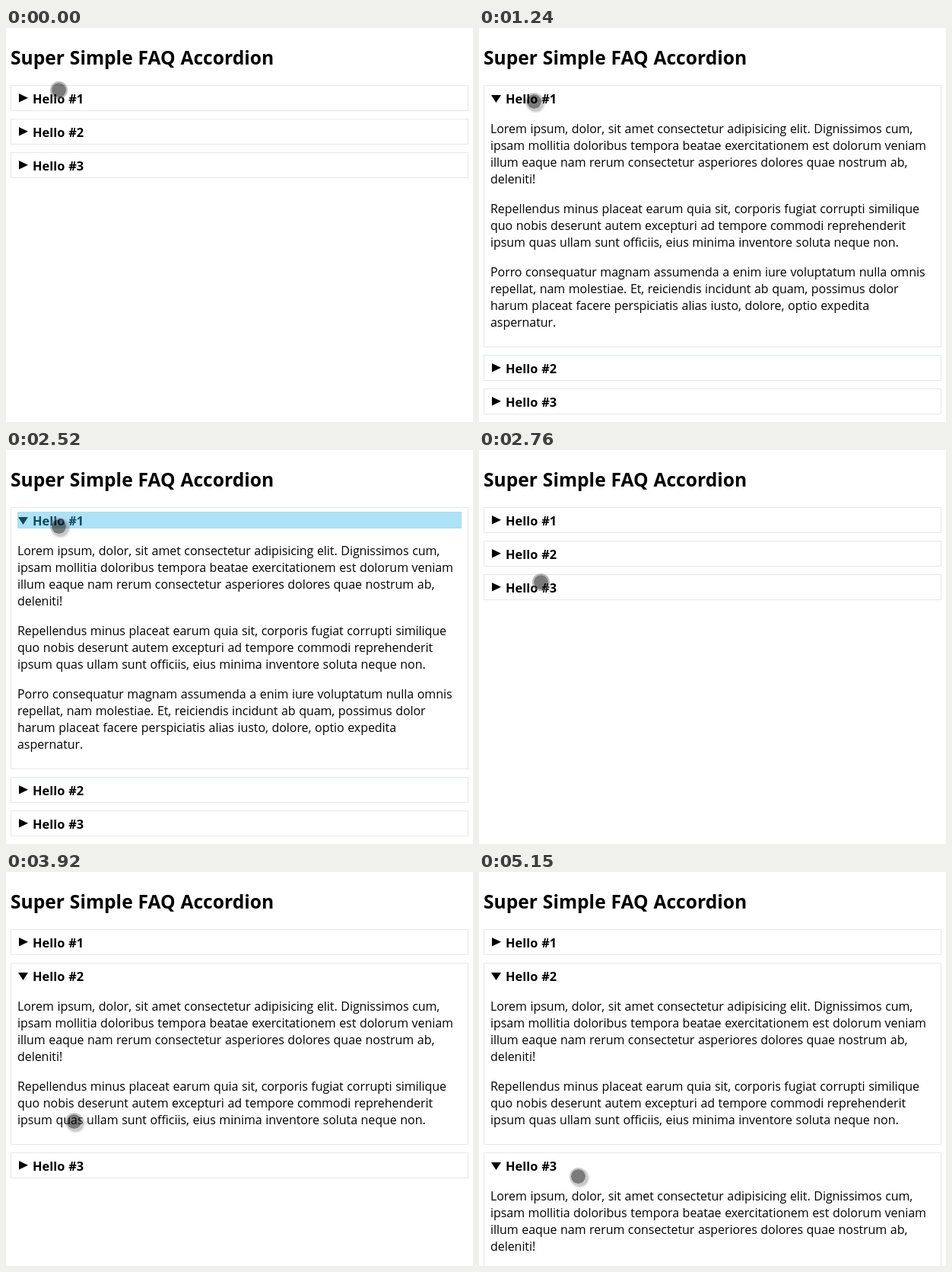
Write an HTML page that moves like this. It is 614 px wide and 517 px high and loops after 6.21 s.

```html
<!DOCTYPE html>
<html lang="en">
<head>
<meta charset="utf-8">
<title>Super Simple FAQ Accordion</title>
<style>
  html, body { margin: 0; width: 100%; height: 100%; overflow: hidden; background: #fff; }
  body { position: relative; color: #000; font: 16px/22px "Open Sans", "Noto Sans", sans-serif; word-spacing: .5px; }
  h2 { position: absolute; left: 6px; top: 22px; margin: 0; font-size: 24.6px; line-height: 34px; white-space: nowrap; }
  #list { position: absolute; left: 6px; top: 75px; width: 602px; }
  .item { box-sizing: border-box; margin-bottom: 10px; padding: 5px 8px; border: 1px solid #e5e7eb; }
  .summary { position: relative; height: 22px; font-weight: 700; font-size: 16.4px; line-height: 23px; }
  .label { position: absolute; left: 20px; }
  .marker { position: absolute; width: 16px; height: 22px; background: #000; clip-path: polygon(2px 5px, 14px 10.7px, 2px 16.5px); }
  .open .marker { clip-path: polygon(1px 7px, 14px 7px, 7.5px 17px); }
  .highlight { position: absolute; inset: 0; background: rgba(51, 181, 229, .4); }
  .content { overflow: hidden; }
  p { position: relative; top: 1px; margin: 17px 0; white-space: pre; letter-spacing: -.05px; }
  #cursor { position: absolute; left: -12px; top: -12px; box-sizing: border-box; width: 23px; height: 23px;
    border: 2px solid rgba(120, 120, 120, .5); border-radius: 50%; background: rgba(0, 0, 0, .52); background-clip: padding-box; }
  .open ~ #cursor, #list:has(.open) ~ #cursor { border-color: rgba(120, 120, 120, .4); box-shadow: 2px 2px 3px rgba(0, 0, 0, .25); }
</style>
</head>
<body>
<h2>Super Simple FAQ Accordion</h2>
<div id="list"></div>
<div id="cursor"></div>
<script>
const LOOP = 6210, STEP = 60, GLIDE = 120;
const OPEN_DELAY = 246, OPEN_TIME = 300;

const paragraphs = [
  `Lorem ipsum, dolor, sit amet consectetur adipisicing elit. Dignissimos cum,
ipsam mollitia doloribus tempora beatae exercitationem est dolorum veniam
illum eaque nam rerum consectetur asperiores dolores quae nostrum ab,
deleniti!`,
  `Repellendus minus placeat earum quia sit, corporis fugiat corrupti similique
quo nobis deserunt autem excepturi ad tempore commodi reprehenderit
ipsum quas ullam sunt officiis, eius minima inventore soluta neque non.`,
  `Porro consequatur magnam assumenda a enim iure voluptatum nulla omnis
repellat, nam molestiae. Et, reiciendis incidunt ab quam, possimus dolor
harum placeat facere perspiciatis alias iusto, dolore, optio expedita
aspernatur.`
];

// Each item lists its taps: the first opens it, the second closes it.
const taps = [[700, 2400], [3320], [4550]];

// The cursor rests between stops and glides to each one just before its arrival time.
const stops = [
  { arrive: 0, x: 70, y: 82 },
  { arrive: 440, x: 67, y: 95 },
  { arrive: 1240, x: 73, y: 97 },
  { arrive: 1820, x: 77, y: 134 },
  { arrive: 1940, x: 71, y: 115 },
  { arrive: 2200, x: 70, y: 101 },
  { arrive: 2760, x: 82, y: 174 },
  { arrive: 3120, x: 91, y: 143 },
  { arrive: 3620, x: 104, y: 184 },
  { arrive: 3920, x: 90, y: 328 },
  { arrive: 4220, x: 99, y: 394 },
  { arrive: 5150, x: 131, y: 400 }
];

// Every tap or glide restarts the stepped clock.
const clockStarts = [0, ...taps.flat(), ...stops.map(stop => stop.arrive - GLIDE)];

const items = taps.map(([opening, closing = Infinity], index) => {
  const texts = paragraphs.slice(0, 3 - index);
  const box = document.createElement("div");
  box.className = "item";
  box.innerHTML = `<div class="summary"><span class="marker"></span><span class="label">Hello #${index + 1}</span>
    <div class="highlight"></div></div><div class="content">${texts.map(text => `<p>${text}</p>`).join("")}</div>`;
  document.getElementById("list").append(box);
  return {
    opening, closing, box,
    content: box.querySelector(".content"),
    highlight: box.querySelector(".highlight"),
    fullHeight: texts.reduce((sum, text) => sum + 22 * text.split("\n").length + 17, 17)
  };
});

const clamp = value => Math.min(1, Math.max(0, value));
const easeOut = k => 1 - (1 - k) ** 1.6;
const highlightAt = elapsed => elapsed < STEP ? 0 : 1 - clamp((elapsed - 220) / 100);

function steppedTime(time) {
  const start = Math.max(...clockStarts.filter(start => start <= time));
  return start + Math.floor((time - start) / STEP) * STEP;
}

function cursorAt(time) {
  let { x, y } = stops[0];
  for (const stop of stops) {
    const k = clamp((time - stop.arrive + GLIDE) / GLIDE);
    x += (stop.x - x) * k;
    y += (stop.y - y) * k;
  }
  return [Math.round(x), Math.round(y)];
}

const cursor = document.getElementById("cursor");

function render(now) {
  const time = steppedTime(now % LOOP);
  for (const { opening, closing, box, content, highlight, fullHeight } of items) {
    const openFor = time - opening - OPEN_DELAY;
    const isOpen = openFor >= 0 && time < closing + OPEN_DELAY;
    box.classList.toggle("open", isOpen);
    content.style.height = (isOpen ? Math.ceil(fullHeight * easeOut(clamp(openFor / OPEN_TIME))) : 0) + "px";
    highlight.style.opacity = Math.max(highlightAt(time - opening), highlightAt(time - closing));
  }
  const [x, y] = cursorAt(time);
  cursor.style.transform = `translate(${x}px, ${y}px)`;
}

const origin = performance.now();
function tick() {
  render(performance.now() - origin);
  requestAnimationFrame(tick);
}
tick();
</script>
</body>
</html>
```
